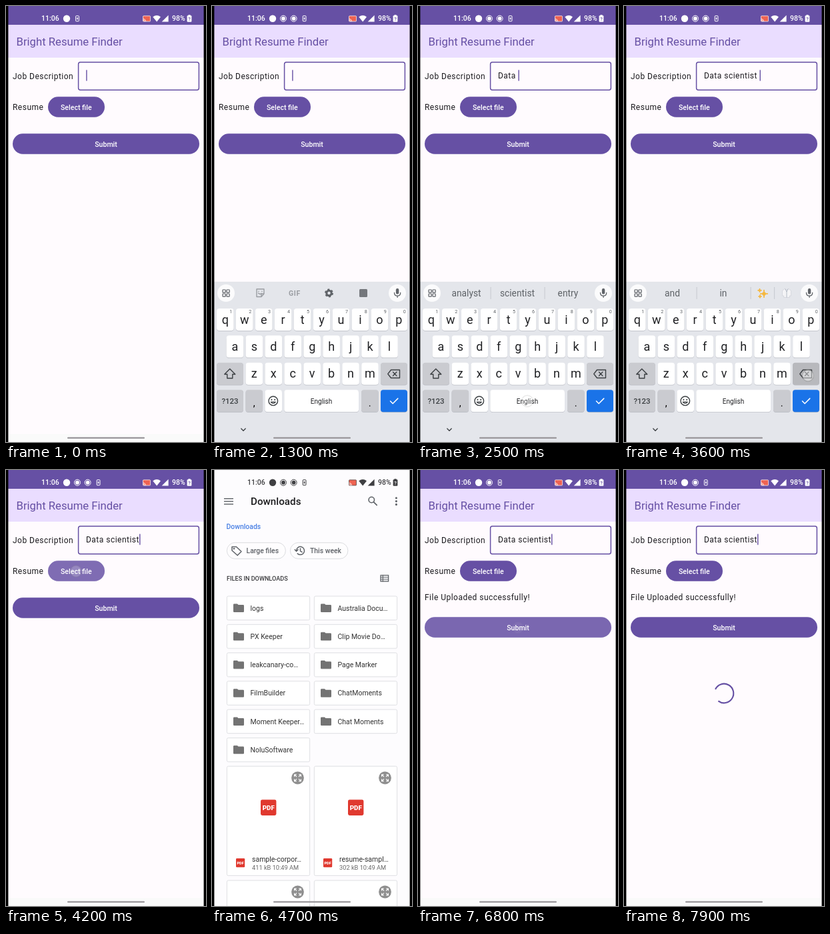
Animation of 300x650 px, one loop 8 s. Source, as an HTML page:

```html
<!DOCTYPE html>
<html lang="en">
<head>
<meta charset="utf-8">
<title>Resume upload</title>
<style>
  html, body { margin: 0; width: 100%; height: 100%; overflow: hidden; background: #000; }
  svg { display: block; width: 300px; height: 650px; font-family: Roboto, "Noto Sans", sans-serif; }
  text { white-space: pre; }
  .body { font-size: 12px; letter-spacing: .48px; fill: #1c1b1f; }
  .btn { font-size: 10.6px; font-weight: 500; fill: #fff; text-anchor: middle; }
  .key { font-size: 18px; fill: #202124; text-anchor: middle; }
  .mid { text-anchor: middle; }
  .med { font-weight: 500; }
  .item { font-size: 10.5px; fill: #333; }
  .line { fill: none; stroke-linecap: round; stroke-linejoin: round; }
</style>
</head>
<body>
<svg id="stage" viewBox="0 0 300 650"></svg>
<script>
const PURPLE = '#6650a4', GREY = '#5f6368', LOOP = 8000, STEP = 100;

const rect = (x, y, w, h, fill, r = 0, more = '') =>
  `<rect x="${x}" y="${y}" width="${w}" height="${h}" rx="${r}" fill="${fill}" ${more}/>`;
const circle = (x, y, r, fill, more = '') => `<circle cx="${x}" cy="${y}" r="${r}" fill="${fill}" ${more}/>`;
const text = (x, y, s, cls = '', more = '') => `<text x="${x}" y="${y}" class="${cls}" ${more}>${s}</text>`;
const line = (d, color, w = 1.4, more = '') => `<path class="line" d="${d}" stroke="${color}" stroke-width="${w}" ${more}/>`;
const shape = (d, fill, more = '') => `<path d="${d}" fill="${fill}" ${more}/>`;
const range = n => [...Array(n).keys()];

/* Status bar */
function status(ink, paper) {
  const record = (x, cls) => `<g class="${cls}">${circle(x, 18.7, 4.5, 'none', `stroke="${ink}"`)}${circle(x, 18.7, 2.9, ink)}</g>`;
  return `<g fill="${ink}">` +
    text(53, 22.4, '11:06', 'med', 'font-size="10.5"') +
    circle(91, 18.7, 5.2, ink) +
    record(107, 'rec1') + record(122.6, 'rec2') +
    `<g class="device">${rect(-2.4, 14.7, 4.8, 8, 'none', .8, `stroke="${ink}"`)}${rect(-.8, 17.2, 1.6, 3, ink)}</g>` +
    rect(205.5, 14.8, 11, 8.2, '#ee6352', .8, `stroke="${ink}" stroke-width=".7"`) +
    line('M206 19.2q3.4.2 3.6 3.6M206 21.2q1.6.1 1.8 1.6', '#fff', .9) +
    shape('M220.3 16.3Q226.2 11.6 232 16.3L226.2 23.5Z', ink) +
    shape('M233.7 23.6L243.6 13.7V23.6Z', ink) +
    text(249, 22.4, '98%', 'med', 'font-size="10.5"') +
    rect(273.4, 13.2, 3.2, 2, ink) + rect(271.6, 14.2, 6.8, 9.6, ink, 1) +
    text(275, 21.9, '?', 'mid med', `font-size="7.5" style="fill:${paper}"`) + '</g>';
}

const handle = rect(92, 642.8, 116, 2.2, '#9b989c', 1.1);

/* Form screen */
const app =
  rect(3, 0, 294, 650, '#fffbfe') + rect(3, 638, 294, 12, '#fafafa') +
  rect(3, 28, 294, 49, '#eaddff') + rect(3, 0, 294, 28, PURPLE) + status('#fff', PURPLE) +
  text(15.5, 59.3, 'Bright Resume Finder', '', `font-size="16.7" fill="${PURPLE}"`) +
  text(10, 109.2, 'Job Description', 'body') +
  rect(108.6, 83.7, 180.8, 41.6, 'none', 3, `stroke="${PURPLE}" stroke-width="1.5"`) +
  text(120, 108.2, '', 'body', 'id="typed"') +
  rect(0, 95.4, 1.4, 16.2, PURPLE, 0, 'id="cursor"') +
  text(10, 155.2, 'Resume', 'body') +
  rect(63, 135.2, 85, 30.5, PURPLE, 15.25) +
  circle(105, 151, 0, '#fff', 'id="pickRipple" clip-path="url(#pickClip)"') +
  text(105.3, 154.8, 'Select file', 'btn') +
  text(10, 194, 'File Uploaded successfully!', 'body', 'id="done"') +
  `<g id="submit">${rect(10, 190.2, 280, 30.5, PURPLE, 15.25)}` +
  circle(150, 205.5, 0, '#fff', 'id="sendRipple" clip-path="url(#sendClip)"') +
  text(150, 209.7, 'Submit', 'btn') + '</g>' +
  line('', PURPLE, 2.1, 'id="spinner" style="stroke-linecap:butt"') + handle;

/* Keyboard */
const PITCH = 28.95, keyAt = {};
const cap = (x, y, w, fill = '#fff') =>
  rect(x, y + .8, w, 33, '#b9bcc4', 4) + rect(x, y, w, 33, fill, 4);

function letters(row, x0, y) {
  return [...row].map((c, i) => {
    const x = x0 + i * PITCH, cx = x + 12.8;
    keyAt[c] = [cx, y + 16.5];
    const digit = y < 460 ? text(x + 21.2, y + 7.4, (i + 1) % 10, 'mid', `font-size="7.2" fill="${GREY}"`) : '';
    return cap(x, y, 25.6) + digit + text(cx, y + 22.5, c, 'key letter');
  }).join('');
}

const FUNC = '#cacbd0';
const toolbar = '<g id="tools">' +
  line('M67 422h11v7l-4 4.5h-7zM78 429h-4v4.5M69.8 425.5h.2M74.8 425.5h.2M69.5 428q2.5 2.5 4.5.5', '#9a9da2', 1.4) +
  text(124, 431.8, 'GIF', 'mid', 'font-size="10.5" font-weight="700" fill="#9a9da2" letter-spacing=".6"') +
  circle(175.5, 428, 3.7, 'none', `stroke="${GREY}" stroke-width="3"`) +
  circle(175.5, 428, 5.5, 'none', `stroke="${GREY}" stroke-width="1.9" stroke-dasharray="2.9 2.86"`) +
  rect(221, 422, 12, 12, '#74777c', 1.5) + '</g>';

const coat = shape('M241 421.5l3 2 3-2 3.5 3v7.5h-2.2v2.5h-8.6v-2.5h-2.2v-7.5z', '#f4f4f6', 'stroke="#c9ccd3" stroke-width=".6"') +
  line('M242 422l2 4 2-4M244 426v8', '#9aa4b4', .7);
const star = (x, y, r) => shape(`M${x} ${y - r}Q${x} ${y} ${x + r} ${y}Q${x} ${y} ${x} ${y + r}Q${x} ${y} ${x - r} ${y}Q${x} ${y} ${x} ${y - r}`, '#f6b73c', 'stroke="#f6b73c"');

const strip = '<g id="strip">' +
  [109, 190].map(x => rect(x - .4, 419, .9, 18, '#c3c6cc')).join('') +
  [72.5, 149, 225].map(x => text(x, 433, '', 'mid word', `font-size="13.8" fill="${GREY}"`)).join('') +
  `<g id="emoji">${rect(225.2, 419, .9, 18, '#c3c6cc')}${star(210, 429, 6)}${star(203.5, 424, 3)}${star(204, 433, 2.5)}${coat}</g></g>`;

const keyboard = '<g id="keyboard">' + rect(3, 411, 294, 239, '#e4e6eb') +
  circle(21, 428, 13, '#fbfbfc') +
  [16, 22].flatMap(x => [423, 429].map(y => rect(x, y, 4.2, 4.2, 'none', .8, `stroke="${GREY}" stroke-width="1.2"`))).join('') +
  circle(278, 428, 13, '#fbfbfc') + rect(275.9, 421, 4.4, 8.6, GREY, 2.2) +
  line('M273.5 427.5q0 4.6 4.6 4.6t4.6-4.6M278.1 432v2.4', GREY, 1.3) +
  toolbar + strip +
  letters('qwertyuiop', 7, 451) + letters('asdfghjkl', 21.6, 491.3) +
  cap(7, 531.7, 40, FUNC) + shape('M26.8 541l8 8h-4v6h-8v-6h-4z', 'none', 'id="shift" stroke="#3c4043" stroke-width="1.4" stroke-linejoin="round"') +
  letters('zxcvbnm', 50.5, 531.7) +
  cap(253, 531.7, 40, FUNC) + rect(253, 531.7, 40, 33, '#000', 4, 'id="delete" opacity=".09"') +
  line('M268.5 542.5h13v12h-13l-4.7-6zM271.5 545.8l5.4 5.4M276.9 545.8l-5.4 5.4', '#3c4043', 1.4) +
  cap(7, 572.3, 40, FUNC) + text(27, 593.3, '?123', 'mid', 'font-size="11.5" fill="#3c4043" font-weight="500"') +
  cap(50.5, 572.3, 25.6, FUNC) + text(63.3, 597, ',', 'mid', 'font-size="15"') +
  cap(79.4, 572.3, 25.6) + circle(91.8, 588.8, 6.8, 'none', 'stroke="#3c4043" stroke-width="1.4"') +
  circle(89.4, 587, 1.1, '#3c4043') + circle(94.2, 587, 1.1, '#3c4043') + line('M88.2 590.4q3.6 4 7.2 0z', '#3c4043', 1.1) +
  cap(108.3, 572.3, 111.7) + rect(108.3, 572.3, 111.7, 33, '#cfd1d6', 4, 'id="space"') +
  text(164, 593, 'English', 'mid', 'font-size="10" fill="#202124"') +
  cap(224, 572.3, 25.6, FUNC) + text(236.8, 597, '.', 'mid', 'font-size="15"') +
  cap(253, 572.3, 40, '#1a73e8') + line('M267.5 589l3.7 3.7 7.6-7.6', '#fff', 1.5) +
  line('M43.8 630l3.2 3.2 3.2-3.2', '#3c4043', 1.3) + handle +
  `<g id="popup">${rect(-14.5, -70, 29, 88, '#c8cace', 4, 'style="filter:drop-shadow(0 1px 1px #0003)"')}` +
  `${text(0, -42, '', 'key', 'id="popChar" style="font-size:22px"')}${text(7, -31, '…', 'mid', 'font-size="9"')}</g></g>`;

/* File picker */
const LEFT = 22, RIGHT = 153;
const box = (x, y, h) => rect(x + .4, y + .4, 124.2, h, '#fff', 2, 'stroke="#dcdde0" stroke-width=".9"');
const folders = [['logs', 'Australia Docu…'], ['PX Keeper', 'Clip Movie Do…'], ['leakcanary-co…', 'Page Marker'],
  ['FilmBuilder', 'ChatMoments'], ['Moment Keeper…', 'Chat Moments'], ['NoluSoftware']];

const folder = (x, y, name) => box(x, y, 35.6) +
  shape(`M${x + 10} ${y + 13}q0-1.3 1.3-1.3h4.6l1.7 1.7h7.1q1.3 0 1.3 1.3v8.3q0 1.3-1.3 1.3h-13.4q-1.3 0-1.3-1.3z`, '#737373') +
  text(x + 35.5, y + 22, name, 'item');

const badge = (x, y, s) => rect(x, y, s, s, '#e0392f', s * .1) +
  text(x + s / 2, y + s * .66, 'PDF', 'mid', `font-size="${s * .42}" font-weight="800" fill="#fff"`);

const expand = (x, y) => circle(x, y, 9.4, '#8f8f8f') +
  range(4).map(i => line('M1.8 -1.8L4.6 -4.6M2.2 -4.9h2.7v2.7', '#fff', 1.2, `transform="translate(${x} ${y}) rotate(${i * 90})"`)).join('');

const file = (x, name, info) => box(x, 441.3, 163) + expand(x + 106.5, 459) + badge(x + 51, 491.5, 23.4) +
  badge(x + 14, 579, 13.2) + text(x + 38, 583.7, name, 'item') +
  text(x + 38, 596.3, info, '', 'font-size="9.25" fill="#6b6b6b"') + box(x, 611.5, 60) + expand(x + 106.5, 629);

const chip = (x, w, label, tx) => rect(x + .4, 108.3, w, 24, '#fefdfe', 12, 'stroke="#d7d8dc" stroke-width=".9"') +
  text(tx, 124, label, 'med', `font-size="10.4" fill="${GREY}"`);

const picker = '<g id="picker">' + rect(3, 0, 294, 650, '#fdfcfe') + status('#3f3f42', '#fff') +
  [42.7, 46.8, 50.9].map(y => rect(18, y - .7, 14, 1.4, GREY)).join('') +
  text(58, 52.3, 'Downloads', 'med', 'font-size="15.2" fill="#1d1d1f"') +
  circle(239.3, 44.5, 4.2, 'none', `stroke="${GREY}" stroke-width="1.6"`) + line('M242.6 47.8l4.6 4.6', GREY, 1.7) +
  [41.8, 46.6, 51.4].map(y => circle(276.4, y, 1.55, GREY)).join('') +
  text(21.5, 88, 'Downloads', 'med', 'font-size="10.4" fill="#4a80e4"') +
  chip(LEFT, 88, 'Large files', 51.5) + chip(117, 86.5, 'This week', 147) +
  line('M30 114.5h6.5l7.5 7-5.8 5.8-8.2-7.3z', GREY, 1.5) + circle(33, 117.3, 1.2, GREY) +
  line('M126.5 120.3a6 6 0 1 1 1.8 4.3M124.2 118.7l2.4 2.4 2.4-2.4M132.5 117v3.8l2.6 1.6', GREY, 1.5) +
  text(LEFT, 164.8, 'FILES IN DOWNLOADS', 'med', 'font-size="9.1" fill="#3a3a3d"') +
  rect(253, 157, 11.6, 9, 'none', 0, `stroke="${GREY}" stroke-width="1.3"`) + line('M253 160h11.6M253 163h11.6M256.3 157v9', GREY, 1.2) +
  folders.map((row, i) => row.map((name, j) => folder(j ? RIGHT : LEFT, 187.7 + i * 42.25, name)).join('')).join('') +
  file(LEFT, 'sample-corpor…', '411 kB 10:49 AM') + file(RIGHT, 'resume-sampl…', '302 kB 10:49 AM') + handle + '</g>';

const stage = document.getElementById('stage');
stage.innerHTML =
  `<defs><clipPath id="pickClip">${rect(63, 135.2, 85, 30.5, '#000', 15.25)}</clipPath>` +
  `<clipPath id="sendClip">${rect(10, 190.2, 280, 30.5, '#000', 15.25)}</clipPath></defs>` +
  app + keyboard + picker + '<g id="touches"></g>' + rect(0, 0, 3.4, 650, '#000') + rect(296.6, 0, 3.4, 650, '#000');

/* Timeline */
const typed = [[0, ''], [1700, 'D'], [1900, 'Da'], [2000, 'Dat'], [2200, 'Data'], [2400, 'Data '],
  [2700, 'Data s'], [2800, 'Data sc'], [3200, 'Data scientist '], [3700, 'Data scientist']];
const words = [[0, ''], [1700, 'D Do Did'], [1900, 'Da Data Fa'], [2000, 'Dat Data Day'], [2200, 'Data Date Days'],
  [2400, 'analyst scientist entry'], [2700, 's scientist so'], [2800, 'sc scientist school'],
  [3200, 'and in'], [3700, 'scientist scientists scientific']];
const presses = [[1600, 'd'], [1800, 'a'], [1900, 't'], [2100, 'a'], [2600, 's'], [2700, 'c']];
const taps = [...presses.map(([t, c]) => [t, ...keyAt[c]]), [1400, 27, 549], [2300, 164, 589],
  [3100, 149, 428], [3500, 276, 551], [4000, 105, 151], [4900, 215, 525], [6500, 150, 235]];

const $ = id => document.getElementById(id);
const all = sel => [...document.querySelectorAll(sel)];
const clamp = v => Math.min(1, Math.max(0, v));
const part = (t, a, b) => clamp((t - a) / (b - a));
const out = u => 1 - (1 - u) ** 3;
const smooth = u => u * u * (3 - 2 * u);
const during = (t, a, b) => t >= a && t < b;
const latest = (list, t) => list.filter(e => e[0] <= t).pop()[1];
const show = (el, on) => el.style.display = on ? '' : 'none';
const set = (el, attrs) => { for (const k in attrs) el.setAttribute(k, attrs[k]); };

const ui = Object.fromEntries(all('[id]').map(el => [el.id, el]));
const letterKeys = all('.letter').map(el => [el, el.textContent]);
const wordEls = all('.word'), devices = all('.device'), rec1 = all('.rec1'), rec2 = all('.rec2');

function ripple(el, t, start, reach) {
  set(el, { r: reach * out(part(t, start, start + 300)), opacity: .16 * (1 - part(t, start + 250, start + 550)) });
  show(el, t >= start);
}

function drawSpinner(t) {
  show(ui.spinner, t > 7000);
  const u = part(t, 7000, 7900), tail = -90 + 295 * u, head = tail + 2 + 280 * smooth(u);
  const at = deg => { const a = deg * Math.PI / 180; return `${150 + 14.3 * Math.cos(a)} ${333 + 14.3 * Math.sin(a)}`; };
  set(ui.spinner, { d: `M${at(tail)}A14.3 14.3 0 ${head - tail > 180 ? 1 : 0} 1 ${at(head)}` });
}

function drawKeyboard(t) {
  const up = out(part(t, 0, 600)) - smooth(part(t, 3800, 4200));
  set(ui.keyboard, { transform: `translate(0 ${239 * (1 - up)})` });
  show(ui.keyboard, up > 0);

  const upper = during(t, 1500, 1700);
  for (const [el, c] of letterKeys) el.textContent = upper ? c.toUpperCase() : c;
  set(ui.shift, { fill: upper ? '#3c4043' : 'none' });
  show(ui.space, during(t, 2300, 2400));
  show(ui.delete, during(t, 3500, 3700));

  const list = latest(words, t).split(' ');
  wordEls.forEach((el, i) => el.textContent = list[i] || '');
  show(ui.strip, list[0]);
  show(ui.tools, !list[0]);
  show(ui.emoji, list.length === 2);

  const press = presses.find(p => during(t, p[0], p[0] + STEP));
  show(ui.popup, press);
  if (press) {
    set(ui.popup, { transform: `translate(${keyAt[press[1]].join(' ')})` });
    ui.popChar.textContent = upper ? press[1].toUpperCase() : press[1];
  }
}

function draw(t) {
  const value = latest(typed, t), uploaded = t >= 5200;
  ui.typed.textContent = value;
  const width = value ? ui.typed.getComputedTextLength() : 0;
  set(ui.cursor, { x: 120.2 + width });
  show(ui.cursor, during(t, 1600, 4300) || (t < 1600 ? t % 1000 < 500 : (t + 300) % 1000 < 500));

  show(ui.done, uploaded);
  set(ui.submit, { transform: `translate(0 ${uploaded ? 29.1 : 0})` });
  ripple(ui.pickRipple, t, 4000, 50);
  ripple(ui.sendRipple, t, 6500, 145);
  drawSpinner(t);
  drawKeyboard(t);

  const open = part(t, 4200, 4500) - part(t, 5100, 5500);
  show(ui.picker, open > 0);
  set(ui.picker, { opacity: open });

  const records = t < 500 ? 0 : t < 1000 ? 1 : t < 5300 ? 2 : 1;
  rec1.forEach(el => show(el, records > 0));
  rec2.forEach(el => show(el, records > 1));
  devices.forEach(el => set(el, { transform: `translate(${107 + 15.8 * records} 0)` }));

  ui.touches.innerHTML = taps.filter(([at]) => during(t, at + STEP, at + 400)).map(([at, x, y]) =>
    circle(x, y, 8.5, '#fff8', `stroke="#8888" stroke-width="1.4" opacity="${(1 - part(t, at + STEP, at + 400)) ** 2 * .8}"`)).join('');
}

const begin = performance.now();
function tick() {
  const t = (performance.now() - begin) % LOOP;
  draw(Math.floor(t / STEP) * STEP);
  requestAnimationFrame(tick);
}
tick();
</script>
</body>
</html>
```
